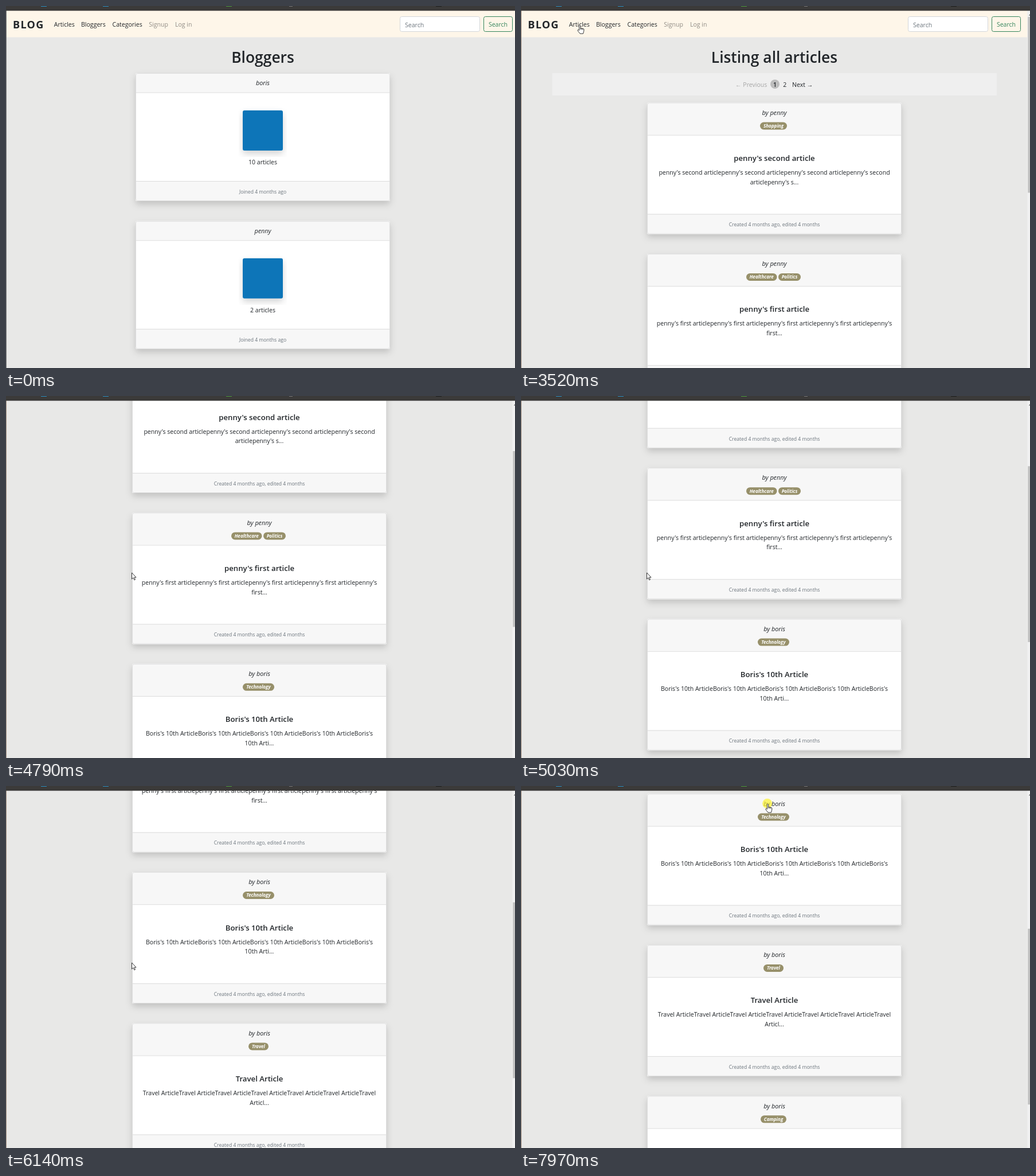
Animation of 888x631 px, one loop 8000 ms. Source, as an HTML page:

```html
<!DOCTYPE html>
<html lang="en">
<head>
<meta charset="utf-8">
<title>Blog</title>
<style>
html, body { margin: 0; width: 100%; height: 100%; overflow: hidden; background: #e8e8e7; }
svg { display: block; width: 888px; height: 631px; font: 10.55px "Open Sans", "Noto Sans", sans-serif; fill: #212529; }
text { white-space: pre; }
.mid { text-anchor: middle; }
.h1 { font-size: 26.4px; font-weight: 600; }
.title { font-size: 13.2px; font-weight: 600; }
.by { font-size: 10.8px; font-style: italic; }
.small { font-size: 8.6px; fill: #6c757d; }
.tag { font-size: 8.1px; font-weight: 700; font-style: italic; fill: #fff; }
.brand { font-size: 18px; font-weight: 700; letter-spacing: 1.3px; }
.muted { fill: #8f8b84; }
.hint { fill: #6c757d; }
.go { fill: #35855c; }
.off { fill: #a5a5a5; }
</style>
</head>
<body>
<svg viewBox="0 0 888 631">
  <defs>
    <filter id="shade" x="-10%" y="-10%" width="120%" height="125%">
      <feDropShadow dx="0" dy="5.6" stdDeviation="5.6" flood-color="#000" flood-opacity=".17"/>
    </filter>
  </defs>
  <rect width="888" height="631" fill="#e8e8e7"/>
  <g id="people"></g>
  <g id="articles"></g>
  <g id="bar"></g>
  <g id="chrome"></g>
  <circle id="click" r="8.5" fill="#fbf236" fill-opacity=".72"/>
  <g id="cursor" fill="#fff" stroke="#222" stroke-width=".9" stroke-linejoin="round">
    <path id="arrow" d="M.5.5V11.6L3 9.3l1.8 4 1.7-.8-1.8-3.8H8z"/>
    <path id="hand" d="M3.4 1.5c0-1.5 2.3-1.5 2.3 0v4l4.4.9c1.4.3 1.9 1 1.8 2.2l-.5 3.2-1 3.4H5L1 10.2c-.9-1.2.4-2.2 1.3-1.5l1.1.9zM5.7 5.5v2.7M7.8 6v2.4M9.9 6.5v2"/>
  </g>
</svg>
<script>
const $ = id => document.getElementById(id);
const LOOP = 8000, STEP = 80, CARD_W = 444, PITCH = 263.4;

const text = (x, y, s, cls = '') => `<text x="${x}" y="${y}" class="${cls}">${s}</text>`;
const mid = (x, y, s, cls = '') => text(x, y, s, 'mid ' + cls);
const rect = (x, y, w, h, fill, more = '') =>
  `<rect x="${x}" y="${y}" width="${w}" height="${h}" fill="${fill}" ${more}/>`;

function nav(width, searchX) {
  const outline = stroke => `rx="3" stroke="${stroke}"`;
  return rect(0, 8, width, 46.5, '#fef6e9') +
    text(12, 39, 'BLOG', 'brand') +
    text(83.8, 36, 'Articles') + text(131, 36, 'Bloggers') + text(185.5, 36, 'Categories') +
    text(249.3, 36, 'Signup', 'muted') + text(295, 36, 'Log in', 'muted') +
    rect(searchX + .5, 18.5, 139, 26, '#fff', outline('#d3d6d9')) +
    text(searchX + 9, 36.5, 'Search', 'hint') +
    rect(searchX + 146.5, 18.5, 50, 26, 'none', outline('#35855c')) +
    mid(searchX + 171.5, 36, 'Search', 'go');
}

function card(x, y, h, head, foot, body) {
  const line = at => rect(0, at, CARD_W, 1, '#dcdcdc');
  return `<g transform="translate(${x} ${y})">` +
    rect(0, 0, CARD_W, h, '#fff', 'rx="3" filter="url(#shade)"') +
    rect(0, 0, CARD_W, head, '#f7f7f7', 'rx="3"') +
    rect(0, foot, CARD_W, h - foot, '#f7f7f7', 'rx="3"') +
    rect(.5, .5, CARD_W - 1, h - 1, 'none', 'rx="3" stroke="#dedede"') +
    line(head) + line(foot) + body + '</g>';
}

const blogger = (y, name, count) => card(226, y, 223, 33.5, 188,
  mid(222, 21, name, 'by') +
  rect(187, 65, 70, 70, '#0a74b8', 'rx="3" filter="url(#shade)"') +
  mid(222, 159, count + ' articles') +
  mid(222, 210, 'Joined 4 months ago', 'small'));

// each tag: label, left edge, width (inside the card)
const pill = ([label, x, w]) =>
  rect(x, 34, w, 13, '#97906a', 'rx="6.5"') + mid(x + w / 2, 43.4, label, 'tag');

const article = ({ by, tags, title, lines }, i) => card(220, 168.5 + i * PITCH, 229, 56.2, 194,
  mid(222, 21.3, 'by ' + by, 'by') + tags.map(pill).join('') +
  mid(222, 101.5, title, 'title') +
  lines.map((s, n) => mid(222, 125.5 + n * 16.8, s)).join('') +
  mid(222, 215.8, 'Created 4 months ago, edited 4 months', 'small'));

const posts = [
  { by: 'penny', tags: [['Shopping', 197, 47]], title: "penny's second article",
    lines: ["penny's second article".repeat(3) + "penny's second", "articlepenny's s..."] },
  { by: 'penny', tags: [['Healthcare', 173, 53.5], ['Politics', 229, 39]], title: "penny's first article",
    lines: ["penny's first article".repeat(4) + "penny's", 'first...'] },
  { by: 'boris', tags: [['Technology', 193, 55]], title: "Boris's 10th Article",
    lines: ["Boris's 10th Article".repeat(4) + "Boris's", '10th Arti...'] },
  { by: 'boris', tags: [['Travel', 203, 35]], title: 'Travel Article',
    lines: ['Travel Article'.repeat(6) + 'Travel', 'Articl...'] },
  { by: 'boris', tags: [['Camping', 198, 45]], title: '', lines: [] }
];

$('people').innerHTML = nav(888, 687) + mid(448, 99, 'Bloggers', 'h1') +
  blogger(117, 'boris', 10) + blogger(374.8, 'penny', 2);

$('articles').innerHTML = nav(883.5, 675) + mid(442, 99, 'Listing all articles', 'h1') +
  rect(54.5, 117, 775.5, 39, '#efefef') +
  text(374, 141, '← Previous', 'off') +
  '<circle cx="443" cy="136.2" r="8" fill="#bdbdbd"/>' +
  mid(443, 140.5, '<tspan font-weight="600">1</tspan>') + mid(460.3, 141, '2') + text(473, 141, 'Next →') +
  posts.map(article).join('');

$('bar').innerHTML = rect(883.5, 8, 4.5, 623, '#f1f1f1') +
  '<path d="M885.8 16.5l2.2-2.2v2.2z" fill="#555"/>' +
  rect(884.3, 19, 3.7, 306.5, '#c1c1c1', 'id="thumb"');

$('chrome').innerHTML = rect(0, 8, 1, 623, '#777', 'id="edge"') +
  rect(0, 0, 888, 8.3, '#3b3a39') +
  [[61, '#2a8fc4'], [169, '#2a8fc4'], [384, '#4c9a3a'], [494, '#777'], [750, '#1d1d1d']]
    .map(([x, c]) => rect(x, 0, x === 494 ? 6 : 10, 1, c)).join('');

// keys: time, then values
const scrollKeys = [
  [4469, 0], [4470, 25], [4790, 228.5], [5350, 411], [5670, 500],
  [6135, 500], [6140, 545.3], [6300, 625], [6540, 681.8]
];
const cursorKeys = [
  [910, 686, 603], [1070, 575, 515], [1310, 285, 270], [1470, 150, 125], [1630, 99, 71.5],
  [1710, 95, 53], [1870, 90, 38], [1950, 90, 33], [2509, 90, 33], [2510, 98, 33],
  [3849, 98, 33], [3850, 104, 48], [4170, 219, 307.5], [6550, 219, 307.5],
  [6930, 403, 276], [7010, 403, 271], [7410, 414, 120], [7810, 426, 31]
];

function sample(keys, t) {
  const n = keys.findIndex(k => k[0] > t);
  if (n < 0) return keys[keys.length - 1].slice(1);
  if (n === 0) return keys[0].slice(1);
  const a = keys[n - 1], b = keys[n], p = (t - a[0]) / (b[0] - a[0]);
  return a.slice(1).map((v, i) => v + (b[i + 1] - v) * p);
}

// the screen refreshes in 80 ms steps counted from each burst of action
const bursts = [0, 910, 3210, 3520, 3850, 4470, 6140, 7010, 7890];
function snap(t) {
  const from = bursts.filter(b => b <= t).pop();
  return from + Math.floor((t - from) / STEP) * STEP;
}

const show = (id, on) => $(id).setAttribute('display', on ? 'inline' : 'none');

function draw(time) {
  const t = snap(time);
  const onArticles = t >= 3520;
  const [scroll] = sample(scrollKeys, t);
  const [x, y] = sample(cursorKeys, t);
  const hand = (t >= 1950 && t < 3850) || t >= 7770;

  show('people', !onArticles);
  show('articles', onArticles);
  show('bar', onArticles);
  $('articles').setAttribute('transform', `translate(0 ${-scroll})`);
  $('thumb').setAttribute('y', 19 + scroll * .337);
  $('edge').setAttribute('fill', t < 3210 ? '#777' : '#a08e80');

  show('cursor', t >= 910);
  show('hand', hand);
  show('arrow', !hand);
  $('cursor').setAttribute('transform', `translate(${x} ${y})`);
  show('click', (t >= 3210 && t < 3290) || t >= 7890);
  $('click').setAttribute('cx', x + 3.7);
  $('click').setAttribute('cy', y - .5);
}

let start;
function tick(now) {
  start ??= now;
  draw((now - start) % LOOP);
  requestAnimationFrame(tick);
}
draw(0);
requestAnimationFrame(tick);
</script>
</body>
</html>
```
